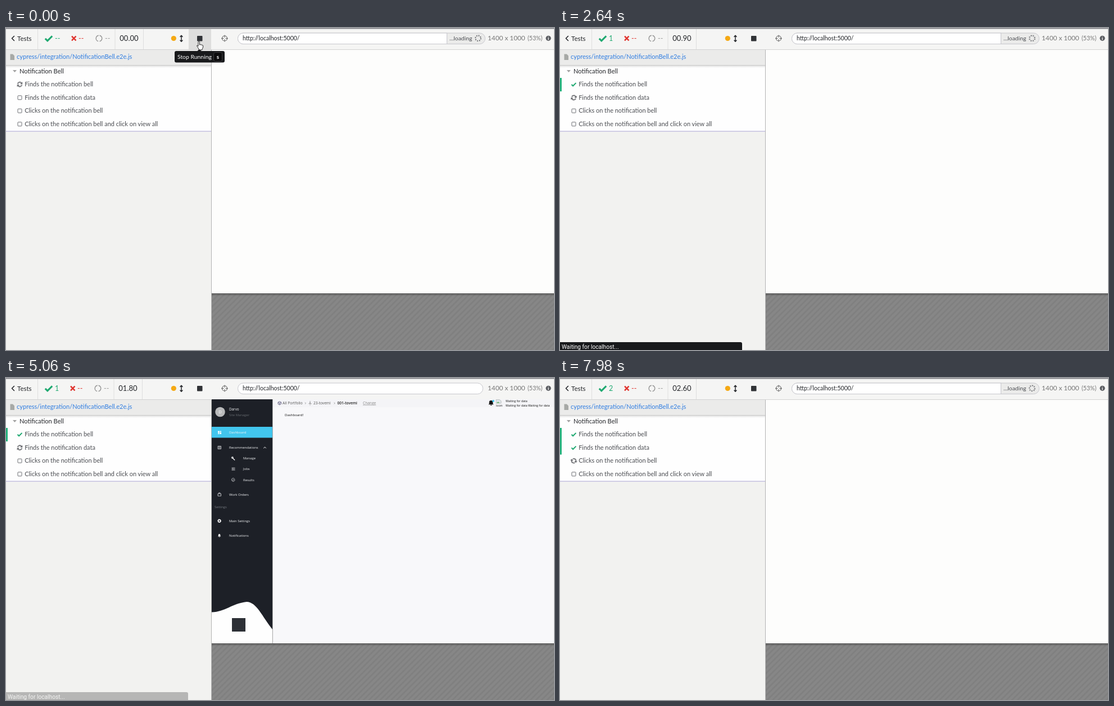
Recreate the animation shown at these times as an HTML page. Size 975 px wide and 574 px high, loop 8 s.

```html
<!DOCTYPE html>
<html lang="en">
<head>
<meta charset="utf-8">
<title>Test runner</title>
<style>
html, body { margin: 0; width: 100%; height: 100%; overflow: hidden; background: #f2f2f0; }
svg { display: block; width: 100%; height: 100%; }
text { font-family: Lato, sans-serif; font-size: 10.95px; fill: #4b4d52; white-space: pre; }
.dark { fill: #24262a; }
.grey { fill: #777; }
.app text { font: 5.9px "Open Sans", sans-serif; fill: #f4f5f7; }
.app .page text { fill: #111; }
.app .crumbs text { font-size: 6.6px; fill: #555; }
.app .tiny text { font-size: 5.2px; }
.line { fill: none; stroke-linecap: round; stroke-linejoin: round; }

/* Every track shares one 8 s cycle; visibility changes are hard cuts. */
.cut { animation: 8s step-end infinite; }
.run1 { animation-name: run1; }
.done1 { animation-name: done1; }
.wait2 { animation-name: wait2; }
.run2 { animation-name: run2; }
.done2 { animation-name: done2; }
.wait3 { animation-name: wait3; }
.run3 { animation-name: run3; }
.tip { animation-name: tip; }
.hand { animation-name: hand; }
.arrow { animation-name: arrow; }
.loading { animation-name: loading; }
.loaded { animation-name: loaded; }
.nudge { animation-name: nudge; }
.spin { animation: spin 8s linear infinite; }
.fast { animation-name: spinFast; }
.cursor { animation: move 8s ease-in-out infinite; }
.status { animation: status 8s linear infinite; }

@keyframes run1 { 0% { visibility: visible } 27.5%, 100% { visibility: hidden } }
@keyframes done1 { 0% { visibility: hidden } 27.5%, 100% { visibility: visible } }
@keyframes wait2 { 0% { visibility: visible } 31%, 100% { visibility: hidden } }
@keyframes run2 { 0% { visibility: hidden } 31% { visibility: visible } 88.75%, 100% { visibility: hidden } }
@keyframes done2 { 0% { visibility: hidden } 88.75%, 100% { visibility: visible } }
@keyframes wait3 { 0% { visibility: visible } 90.6%, 100% { visibility: hidden } }
@keyframes run3 { 0% { visibility: hidden } 90.6%, 100% { visibility: visible } }
@keyframes tip { 0% { visibility: visible } 21.25%, 100% { visibility: hidden } }
@keyframes hand { 0% { visibility: visible } 13.2%, 100% { visibility: hidden } }
@keyframes arrow { 0% { visibility: hidden } 13.2% { visibility: visible } 18%, 100% { visibility: hidden } }
@keyframes loading {
  0% { visibility: visible } 23% { visibility: hidden } 29.25% { visibility: visible }
  45% { visibility: hidden } 90.6%, 100% { visibility: visible }
}
@keyframes loaded {
  0% { visibility: hidden } 23% { visibility: visible } 29.25% { visibility: hidden }
  45% { visibility: visible } 90.6%, 100% { visibility: hidden }
}
@keyframes nudge { 0% { transform: none } 27.5%, 100% { transform: translate(-2px, 0) } }
@keyframes spin { to { transform: rotate(560deg) } }
@keyframes spinFast { to { transform: rotate(1120deg) } }
@keyframes move {
  0%, 10% { transform: translate(342px, 24px) }
  15.75% { transform: translate(298px, -13px) }
  18%, 100% { transform: translate(292px, -30px) }
}
@keyframes status {
  0%, 31.99% { opacity: 0 } 32%, 60.75% { opacity: 1 } 64.2%, 100% { opacity: 0 }
}
</style>
</head>
<body>
<svg viewBox="0 0 975 574">
  <defs>
    <path id="check" d="M-4 .2L-1.4 2.8L4 -2.6" fill="none" stroke="#1fa971" stroke-width="2"/>
    <rect id="box" x="-3.5" y="-3.5" width="7" height="7" rx=".8" fill="none" stroke="#6b6d72"/>
    <g id="half">
      <path d="M-3.8 -.8A3.9 3.9 0 0 1 2.9 -2.6" fill="none" stroke="#4b4d52" stroke-width="1.5"/>
      <path d="M4.6 -4.3V-.5H.8Z" fill="#4b4d52"/>
    </g>
    <g id="refresh"><use href="#half"/><use href="#half" transform="rotate(180)"/></g>
    <linearGradient id="shade" x2="0" y2="1">
      <stop stop-opacity=".3"/><stop offset="1" stop-opacity="0"/>
    </linearGradient>
    <pattern id="hatch" width="7" height="7" patternUnits="userSpaceOnUse" patternTransform="rotate(45)">
      <rect width="7" height="7" fill="#878787"/><rect width="3" height="7" fill="#808080"/>
    </pattern>
  </defs>

  <!-- Panels -->
  <rect width="975" height="574" fill="#f2f2f0"/>
  <rect width="975" height="38" fill="#f5f5f4"/>
  <rect y="38" width="365" height="29" fill="#ebebea"/>
  <rect y="67" width="365" height="117" fill="#fefefe"/>
  <rect y="66" width="365" height="5" fill="url(#shade)" opacity=".5"/>
  <rect y="183.5" width="365" height="1.2" fill="#b8b2dc"/>
  <rect x="366" y="38" width="609" height="435" fill="#fdfdfc"/>
  <rect x="366" y="473" width="609" height="101" fill="url(#hatch)"/>
  <rect x="366" y="473" width="609" height="5" fill="url(#shade)"/>
  <path d="M366 473.5H975" stroke="#555"/>
  <path d="M365.5 38V574" stroke="#b4b4b4"/>
  <path d="M0 38.5H975" stroke="#d2d2d2"/>
  <rect class="cut tip" x="325" y="2" width="40" height="36" fill="#dededd"/>
  <rect width="975" height="1.6" fill="#85858a"/>

  <!-- Toolbar -->
  <path class="line" d="M14.5 14.5L10.5 18.5L14.5 22.5" stroke="#24262a" stroke-width="1.6"/>
  <text class="dark" x="20" y="22.7" style="font-size:11.5px">Tests</text>
  <path d="M56.5 2V38" stroke="#dedede"/>
  <use href="#check" transform="translate(76 18.5) scale(1.55)"/>
  <text id="passed" x="87" y="23" style="fill:#1fa971;font-size:12.5px">--</text>
  <g class="cut nudge">
    <path d="M117 14.7L124.5 22.3M124.5 14.7L117 22.3" stroke="#e0342f" stroke-width="2.5"/>
    <text x="129" y="23" style="fill:#e0342f;font-size:12.5px">--</text>
    <circle cx="165.5" cy="18.5" r="5.3" fill="none" stroke="#999" stroke-width="1.5" stroke-dasharray="14.2 2.45" transform="rotate(-80 165.5 18.5)"/>
    <text x="176" y="23" style="fill:#999;font-size:12.5px">--</text>
    <path d="M194 2V38M244.5 2V38" stroke="#dedede"/>
    <text id="timer" class="dark" x="202.3" y="23" style="font-size:13px">00.00</text>
  </g>
  <circle cx="298.3" cy="18.5" r="4.6" fill="#f5a914"/>
  <path class="line" d="M312 14.5V23M310 15.5L312 13.3L314 15.5M310 22L312 24.2L314 22" stroke="#24262a" stroke-width="1.5"/>
  <rect x="340" y="14" width="9.5" height="9.5" rx="1" fill="#303236"/>
  <g fill="none" stroke="#666">
    <circle cx="389" cy="18.5" r="4.5" stroke-width="1.2"/>
    <path d="M389 12.5V17M389 20V24.5M383 18.5H387.5M390.5 18.5H395"/>
  </g>
  <g class="cut loading">
    <rect x="412.5" y="9" width="440" height="19.5" rx="9.7" fill="#ebebea" stroke="#c6c6cc"/>
    <path d="M784.5 9H422.2a9.75 9.75 0 0 0 0 19.5H784.5Z" fill="#fff" stroke="#c6c6cc"/>
    <text x="789" y="22" style="font-size:10.4px">...loading</text>
    <g transform="translate(840 18.3)">
      <circle class="spin fast" r="4.8" fill="none" stroke="#4b4d52" stroke-width="1.8" stroke-dasharray="1.7 2.07"/>
    </g>
  </g>
  <rect class="cut loaded" x="412.5" y="9" width="436" height="19.5" rx="9.7" fill="#fff" stroke="#c6c6cc"/>
  <text class="dark" x="421" y="22.2" style="font-size:10.5px">http://localhost:5000/</text>
  <text class="grey" x="857" y="22.3" style="font-size:11.8px">1400 x 1000</text>
  <text class="grey" x="928" y="22.2" style="font-size:10.5px">(53%)</text>
  <circle cx="965" cy="18.3" r="4.6" fill="#5a5c61"/>
  <path d="M965 15.4V16.6M965 17.6V21.3" stroke="#fff" stroke-width="1.3"/>

  <!-- Test list -->
  <path d="M7.5 46.5H12L15 49.5V57H7.5Z" fill="#a7a9a6"/>
  <text x="19" y="55.3" style="fill:#2f7de1;font-size:11.05px">cypress/integration/NotificationBell.e2e.js</text>
  <path d="M12 75H19L15.5 79Z" fill="#a0a0a0"/>
  <text class="dark" x="24" y="80.7" style="font-size:11.1px">Notification Bell</text>
  <text x="33.2" y="104.2">Finds the notification bell</text>
  <text x="33.2" y="127.8">Finds the notification data</text>
  <text x="33.2" y="151.2">Clicks on the notification bell</text>
  <text x="33.2" y="174.8">Clicks on the notification bell and click on view all</text>
  <g transform="translate(24.5 100.5)">
    <g class="cut run1"><use class="spin" href="#refresh"/></g>
    <use class="cut done1" href="#check"/>
  </g>
  <g transform="translate(24.5 124.2)">
    <use class="cut wait2" href="#box"/>
    <g class="cut run2" transform="rotate(-174)"><use class="spin" href="#refresh"/></g>
    <use class="cut done2" href="#check"/>
  </g>
  <g transform="translate(24.5 147.7)">
    <use class="cut wait3" href="#box"/>
    <g class="cut run3" transform="rotate(-508)"><use class="spin" href="#refresh"/></g>
  </g>
  <use href="#box" x="24.5" y="171.3"/>
  <rect class="cut done1" y="89" width="3" height="24" fill="#25b47e"/>
  <rect class="cut done2" y="113" width="3" height="23.5" fill="#25b47e"/>

  <!-- Application under test -->
  <g class="app cut loaded">
    <rect x="474" y="38" width="501" height="435" fill="#f8f8fa"/>
    <rect x="474" y="38" width="501" height="14" fill="#f4f4f7"/>
    <rect x="366" y="38" width="108" height="435" fill="#1d2027"/>
    <circle cx="381" cy="60.5" r="8.8" fill="#b9babb"/>
    <text x="381" y="63.2" text-anchor="middle" style="font-size:7.5px;fill:#fff">D</text>
    <text x="397" y="57.6" style="font-size:6.3px">Darvo</text>
    <text x="397" y="68" style="fill:#666a70">Site Manager</text>
    <rect x="366" y="87" width="108" height="19.5" fill="#42c6ee"/>
    <g id="menu"></g>
    <path class="line" d="M458.5 125L460.5 123L462.5 125" stroke="#fff"/>
    <text x="371" y="232.3" style="fill:#777b82">Settings</text>
    <g fill="#fff">
      <path d="M377 94.5h2.7v3.2H377zM380.5 94.5h2.5v1.7h-2.5zM377 98.4h2.7v1.6H377zM380.5 97h2.5v3h-2.5z"/>
      <path d="M401 140.5a2.2 2.2 0 0 1 3.5 2.4L407.6 146l-1 1-3.2-3.2a2.2 2.2 0 0 1-2.4-3l1.4 1.2 1-1z"/>
      <circle cx="379.6" cy="254.7" r="2.1" fill="none" stroke="#fff" stroke-width="1.6"/>
      <circle cx="379.6" cy="254.7" r="2.9" fill="none" stroke="#fff" stroke-width=".9" stroke-dasharray="1.4 1.6"/>
      <path d="M377 282.5l.8-1v-1.6a1.8 1.8 0 0 1 3.6 0v1.6l.8 1zM379 283h1.3v.8H379z"/>
    </g>
    <g fill="none" stroke="#e4e5e8" stroke-width=".8">
      <path d="M377 121.5h5.5v5H377zM378 123h3.5M378 124.8h3.5"/>
      <path d="M401.5 160.2h3M406 160.2h1.5M401.5 162.2h1.5M404 162.2h3.5M401.5 164.2h3M406 164.2h1.5M405 159.4v1.6M403.4 161.4v1.6M405 163.4v1.6"/>
      <path d="M407 181a2.8 2.8 0 1 1-1.2-1.9M402.8 181.3l1.2 1.1 2.8-2.9"/>
      <path d="M377 206.3h5.5v4H377zM378.6 206v-1.3h2.3v1.3"/>
    </g>
    <path d="M366 417.5C390 417 402 402 428 399C446 399 456 426 474 448V473H366Z" fill="#fefefe"/>
    <rect x="402" y="428" width="24" height="24" fill="#2d3036"/>
    <path d="M474.3 38V473" stroke="#666" stroke-width=".6"/>
    <g class="page">
      <g class="crumbs">
        <path d="M484 43.3l2.8-1.5 2.8 1.5v3l-2.8 1.5-2.8-1.5zl2.8 1.5 2.8-1.5M486.8 44.8v3" fill="none" stroke="#4c4a70" stroke-width=".8"/>
        <text x="492" y="47.2">All Portfolio</text>
        <path class="line" d="M532.3 43.8l1.2 1.2-1.2 1.2M584 43.8l1.2 1.2-1.2 1.2M541 41.3v3.2l-2.3 1.3M541 44.5l2.5 1.5M541 44.5v3.6" stroke="#777" stroke-width=".7"/>
        <text x="547" y="47.2">23-tovemi</text>
        <text x="589.5" y="47.2" style="font-weight:600;fill:#222">001-tovemi</text>
        <text x="635" y="46.8" style="fill:#888;text-decoration:underline">Change</text>
      </g>
      <text x="496" y="68.2" style="font-size:6.1px">Dashboard!</text>
      <path d="M858.5 47.2l1.2-1.4v-2.6a3.3 3.3 0 0 1 6.6 0v2.6l1.2 1.4zM862 47.7h2.2v1.3H862z" fill="#111"/>
      <circle cx="867" cy="41" r="1.9" fill="#42c6ee"/>
      <path d="M872 38.5h6l3 2.5v4h-9z" fill="#dfe6ea" stroke="#aaa" stroke-width=".6"/>
      <path d="M872.5 44.7l3-2.5 3 2.5z" fill="#69b46a"/>
      <g class="tiny">
        <text x="872" y="51.3" style="font-size:5.8px">icon</text>
        <text x="889" y="43">Waiting for data</text>
        <text x="889" y="51">Waiting for data Waiting for data</text>
      </g>
    </g>
  </g>

  <!-- Overlays -->
  <g class="status">
    <path d="M0 560H321a3 3 0 0 1 3 3V574H0Z" fill="#18191b"/>
    <text x="3" y="572.3" style="font:10.2px Roboto,sans-serif;fill:#fff">Waiting for localhost...</text>
  </g>
  <g class="cut tip">
    <path d="M339.5 42L344 37.5L348.5 42Z" fill="#18191b"/>
    <rect x="300" y="41" width="89" height="20.5" rx="3" fill="#18191b"/>
    <text x="305" y="55" style="fill:#fff;font-size:10.4px">Stop Running</text>
    <rect x="369.5" y="43.5" width="15" height="16" rx="3" fill="#0c0c0d" stroke="#3c3c3e"/>
    <text x="377" y="55" text-anchor="middle" style="fill:#fff;font-size:10px;font-weight:700">s</text>
  </g>
  <g class="cursor" stroke="#fff" stroke-width=".9" stroke-linejoin="round">
    <path class="cut hand" d="M0 1.2a1.2 1.2 0 0 1 2.4 0V6l1.8-.4 2 .5 2 .8.5 1.2-.5 3.4-1.2 2V15H1.2v-1.5L-1.5 9.5l-1-2 1.2-.5L0 8.5Z" fill="#fff" stroke="#111"/>
    <path class="cut arrow" d="M0 0V12L2.7 9.5L4.8 15L7 14L4.7 8.8H8.5Z" fill="#111"/>
  </g>
</svg>
<script>
const CYCLE = 8000;
const menu = [
  ["Dashboard", 397, 99], ["Recommendations", 397, 125.8], ["Manage", 422, 145.2],
  ["Jobs", 422, 164.2], ["Results", 422, 183.6], ["Work Orders", 397, 209.6],
  ["Main Settings", 397, 256.7], ["Notifications", 397, 282.8]
];
document.getElementById("menu").innerHTML =
  menu.map(([label, x, y]) => `<text x="${x}" y="${y}">${label}</text>`).join("");

// Clock readings in seconds at moments of the cycle, linear in between.
const clock = [[0, 0], [1000, 0], [1260, .1], [2640, .9], [4040, 1.44], [5060, 1.8], [6320, 2.3], [7090, 2.6], [CYCLE, 2.6]];
const timer = document.getElementById("timer");
const passed = document.getElementById("passed");

function reading(t) {
  const i = clock.findIndex(([end]) => t < end);
  const [t0, v0] = clock[i - 1], [t1, v1] = clock[i];
  return v0 + (v1 - v0) * (t - t0) / (t1 - t0);
}

const start = performance.now();
function draw() {
  const t = Math.max(0, performance.now() - start) % CYCLE;
  timer.textContent = reading(t).toFixed(2).padStart(5, "0");
  passed.textContent = t < 2200 ? "--" : t < 7100 ? "1" : "2";
  requestAnimationFrame(draw);
}
draw();
</script>
</body>
</html>
```
